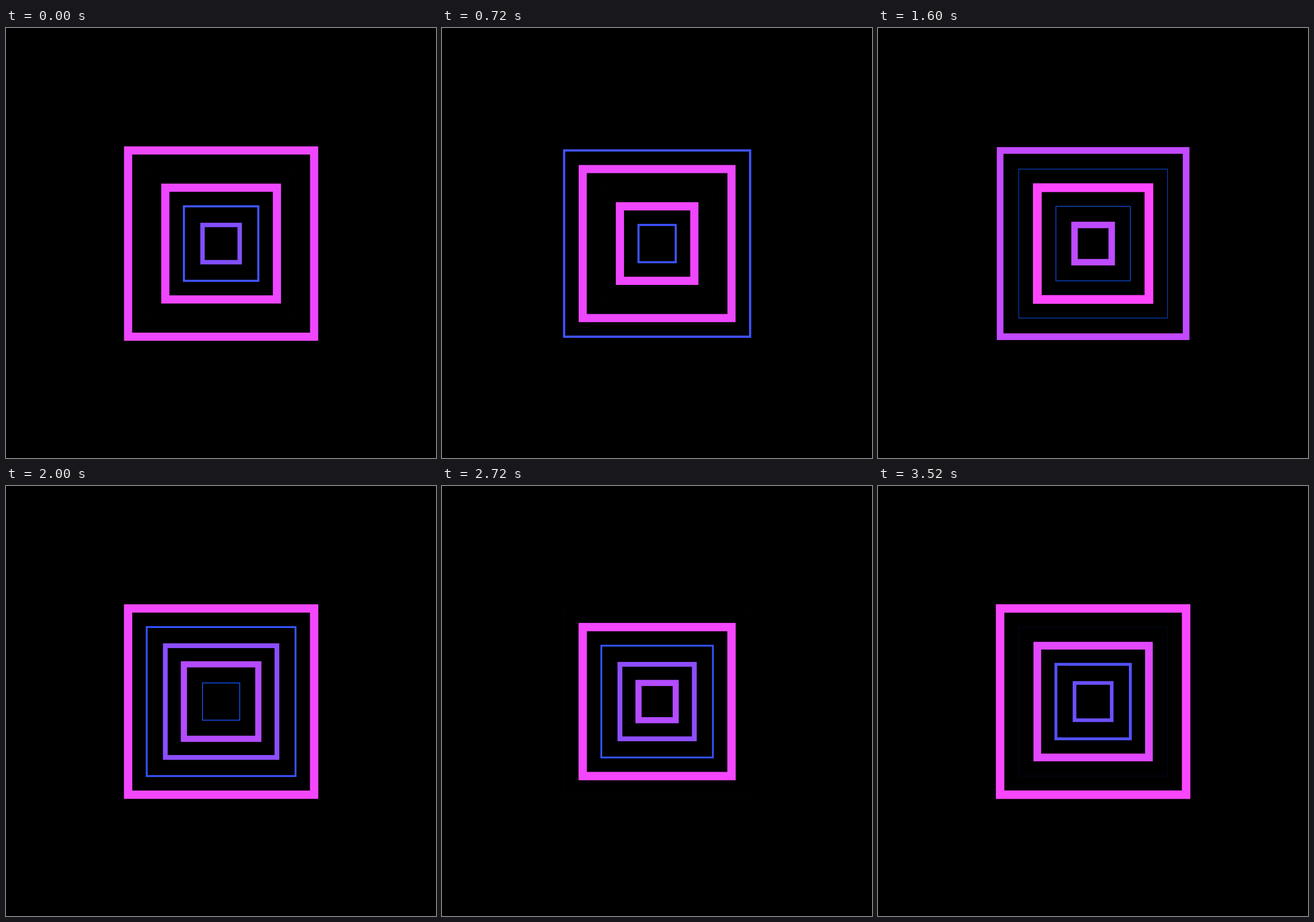
An HTML page with a canvas for the animation above (3600 ms loop, 749x748 px).

```html
<!DOCTYPE html>
<html lang="en">
<head>
<meta charset="utf-8">
<title>Pulsing squares</title>
<style>
html, body { margin: 0; width: 100%; height: 100%; overflow: hidden; background: #000; }
canvas { display: block; }
</style>
</head>
<body>
<canvas id="stage" width="749" height="748"></canvas>
<script>
const ctx = document.getElementById('stage').getContext('2d');
const LOOP = 3600, STEP = 80;
const CENTER = { x: 374.7, y: 375 };
const COUNT = 5, SPACING = 32.4, MAX_WIDTH = 15.2;
const SPEED = 0.2075;                    // degrees per ms
const FIRST_PHASE = -210, LAG = 150.2;   // degrees, outermost square first
const THIN = [0, 88, 255], THICK = [255, 70, 255];

const mix = (a, b, u) => a.map((v, i) => Math.round(v + (b[i] - v) * u));

function draw(time) {
  ctx.fillStyle = '#000';
  ctx.fillRect(0, 0, 749, 748);
  for (let i = 0; i < COUNT; i++) {
    const half = SPACING * (COUNT - i);
    const angle = (SPEED * time + FIRST_PHASE - LAG * i) * Math.PI / 180;
    const pulse = (1 - Math.cos(angle)) / 2;
    ctx.lineWidth = Math.max(0.04, MAX_WIDTH * pulse);
    ctx.strokeStyle = `rgb(${mix(THIN, THICK, pulse)})`;
    ctx.strokeRect(CENTER.x - half, CENTER.y - half, half * 2, half * 2);
  }
}

const start = performance.now();
function tick() {
  const time = (performance.now() - start) % LOOP;
  draw(Math.floor(time / STEP) * STEP);
  requestAnimationFrame(tick);
}
tick();
</script>
</body>
</html>
```
